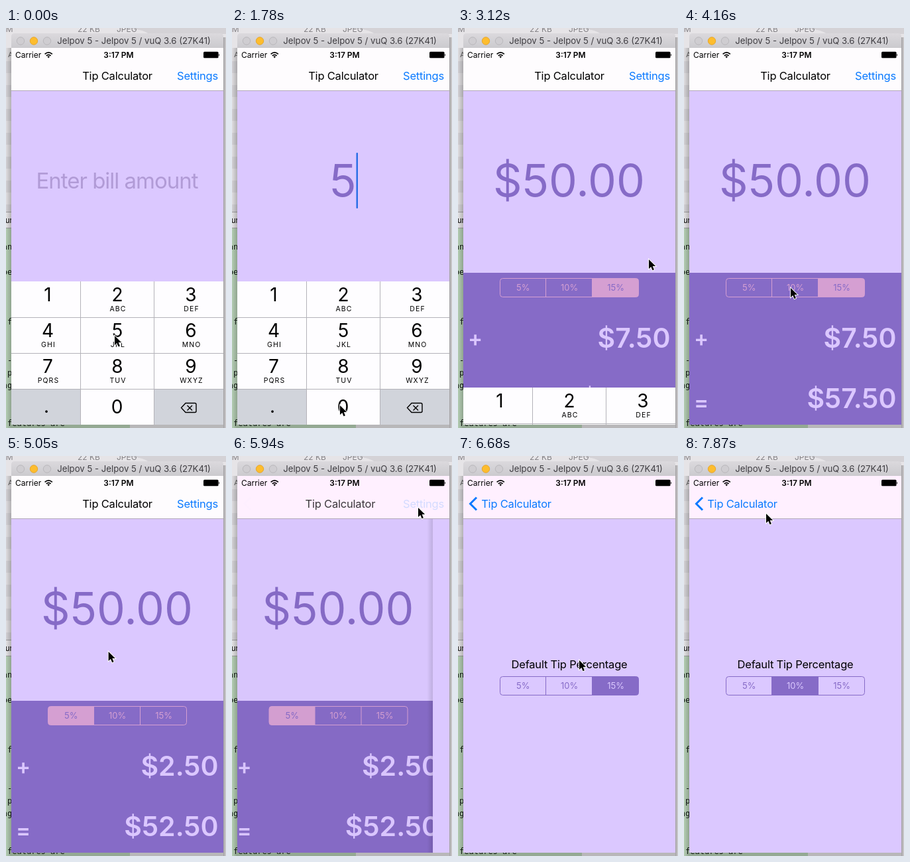
Animation, 332 px wide and 603 px high, one loop 8 s. Source, as an HTML page:

```html
<!DOCTYPE html>
<html lang="en">
<head>
<meta charset="utf-8">
<title>Tip Calculator</title>
<style>
  html, body { margin: 0; width: 332px; height: 603px; overflow: hidden; background: #dcdadd; }
  svg { display: block; }
  text { font: 400 16.5px Inter, sans-serif; font-optical-sizing: none; white-space: pre; }
  .label { letter-spacing: -.2px; }
  .status { font-size: 12px; }
  .code { font: 12px "DejaVu Sans Mono", monospace; }
  .desk { font-size: 12px; fill: #858387; }
  .digit { font-size: 28px; }
  .letters { font-size: 10.5px; letter-spacing: 1.1px; }
  .seg text { font-size: 13px; }
  .bill { font-size: 68px; fill: #866bc7; }
  .hint { font-size: 33px; letter-spacing: -1px; fill: #b19bd6; }
  .sum { font-weight: 600; font-size: 41px; fill: #dbc7ff; }
  .sign { font-weight: 600; font-size: 33px; fill: #dbc7ff; }
  .mid { text-anchor: middle; }
  .end { text-anchor: end; }
</style>
</head>
<body>
<svg width="332" height="603" viewBox="0 0 332 603">
  <defs>
    <clipPath id="screen"><rect x="8" y="95" width="320" height="503"/></clipPath>
    <linearGradient id="bar" x2="0" y2="1"><stop stop-color="#dbd9dd"/><stop offset="1" stop-color="#cbcace"/></linearGradient>
    <linearGradient id="edge"><stop stop-opacity="0"/><stop offset="1" stop-opacity=".12"/></linearGradient>
    <linearGradient id="left"><stop stop-opacity=".03"/><stop offset="1" stop-opacity=".22"/></linearGradient>
    <linearGradient id="right"><stop stop-opacity=".3"/><stop offset="1" stop-opacity=".1"/></linearGradient>
  </defs>

  <g id="desktop">
    <rect width="332" height="603" fill="#e6e4e7"/>
    <path d="M186 0Q208 3 216 9H332V0z" fill="#d4d2d6"/>
    <text class="desk" x="-8" y="6">PM</text>
    <text class="desk" x="108" y="6">22 KB</text>
    <text class="desk" x="167" y="6">JPEG</text>
    <g id="rows"></g>
    <path d="M0 302H8V598H187V603H0z" fill="#b9d3b8"/>
    <rect y="277" width="8" height="25" fill="#e9e8ea"/>
    <path d="M0 277.5H8M0 301.5H8" stroke="#a3a2a5"/>
    <text x="-1" y="294" style="font-size:11px">ur</text>
    <text x="3" y="44" style="font-size:11px" fill="#666">A</text>
    <g id="notes"></g>
    <rect y="30" width="8" height="573" fill="url(#left)"/>
    <rect x="328" y="14" width="4" height="589" fill="url(#right)"/>
    <rect x="8" y="598" width="320" height="5" opacity=".2"/>
  </g>

  <path d="M8 30V13Q8 8 13 8H323Q328 8 328 13V30z" fill="url(#bar)"/>
  <g stroke-width="1" fill="#cfcdd1" stroke="#b9b7bb">
    <circle cx="22" cy="19.5" r="5.7"/>
    <circle cx="42" cy="19.5" r="5.7" fill="#fdbd2e" stroke="#e6a52a"/>
    <circle cx="62" cy="19.5" r="5.7"/>
  </g>
  <text class="mid" x="193" y="24" style="font-size:13.2px" fill="#3f3d42">Jelpov 5 - Jelpov 5 / vuQ 3.6 (27K41)</text>

  <g clip-path="url(#screen)">
    <g id="main">
      <rect x="8" y="95" width="420" height="503" fill="#dbc8ff"/>
      <text id="hint" class="hint mid" x="167.5" y="242">Enter bill amount</text>
      <text id="bill" class="bill mid" x="167.5" y="254.3"></text>
      <g id="panel">
        <rect x="8" y="369" width="420" height="229" fill="#866bc7"/>
        <g id="tipSeg" class="seg"></g>
        <text class="sign" x="15" y="480">+</text>
        <text class="sign" x="15" y="575.5">=</text>
        <text id="tip" class="sum end" x="320.5" y="481.5"></text>
        <text id="total" class="sum end" x="320.5" y="572.5"></text>
      </g>
      <rect id="caret" width="2.5" rx="1" fill="#2b6fe6"/>
    </g>
    <rect id="dim" x="8" y="95" width="320" height="503"/>
    <g id="prefs">
      <rect x="-1" y="95" width="9" height="503" fill="url(#edge)"/>
      <rect x="8" y="95" width="320" height="503" fill="#dbc8ff"/>
      <text class="label mid" x="168" y="320">Default Tip Percentage</text>
      <g id="prefSeg" class="seg"></g>
    </g>
    <g id="pad"></g>
  </g>

  <rect id="nav" x="8" y="30" width="320" height="64"/>
  <path d="M8 94.5H328" stroke="#b5abba"/>
  <text class="status" x="14" y="45">Carrier</text>
  <g fill="none" stroke="#000" stroke-width="1.7">
    <path d="M58.6 39.3Q64.2 34.3 69.8 39.3M60.8 41.8Q64.2 38.8 67.6 41.8"/>
    <path d="M62.4 43L64.2 45.4 66 43Q64.2 41.6 62.4 43z" fill="#000" stroke="none"/>
  </g>
  <text class="status mid" x="170" y="45" style="font-weight:600">3:17 PM</text>
  <rect x="298" y="35.7" width="22.5" height="9.6" rx="1.5"/>
  <path d="M321 39Q323 40.5 321 42.4z"/>
  <text id="title" class="label mid" y="78">Tip Calculator</text>
  <text id="settings" class="label end" x="320" y="78" fill="#0a7aff">Settings</text>
  <g id="back" fill="none" stroke="#0a7aff" stroke-width="3">
    <path d="M28 62.5L18.5 72 28 81.5"/>
  </g>
  <text id="backLabel" class="label mid" y="78" fill="#0a7aff">Tip Calculator</text>

  <path id="cursor" d="M0 1V15L3.3 12 5.5 17.2 7.9 16.2 5.7 11.1H10.1z" stroke="#fff" stroke-width="1.8" paint-order="stroke"/>
</svg>
<script>
const LOOP = 8000;
const $ = id => document.getElementById(id);
const set = (id, attrs) => { for (const k in attrs) $(id).setAttribute(k, attrs[k]); };
const text = (x, y, str, cls, fill = '#000') => `<text x="${x}" y="${y}" class="${cls}" fill="${fill}">${str}</text>`;
const rect = (x, y, w, h, fill, more = '') => `<rect x="${x}" y="${y}" width="${w}" height="${h}" fill="${fill}" ${more}/>`;

// Screen refreshes come in bursts: first time, last time, count.
const bursts = [
  [0, 0, 1], [300, 300, 1], [600, 600, 1], [1040, 1340, 3], [1640, 1780, 2], [2080, 2230, 2],
  [2530, 2820, 3], [3120, 3570, 4], [3870, 4750, 7], [5050, 6090, 8], [6230, 7270, 8], [7570, 7870, 3]
];
const ticks = bursts.flatMap(([a, b, n]) =>
  Array.from({ length: n }, (_, i) => Math.round((a + (n > 1 ? i * (b - a) / (n - 1) : 0)) / 10) * 10));

// Tables of [time, value...]; tween interpolates, hold keeps the last value.
const pointer = [
  [0, 164, 463], [880, 164, 463], [1340, 163, 568], [2380, 163, 568], [2820, 288, 348],
  [3720, 288, 348], [3870, 270, 342], [4160, 161, 391], [4310, 161, 391], [4600, 97, 391],
  [4900, 97, 391], [5350, 270, 100], [5500, 281, 77], [6230, 281, 77], [6680, 183, 307],
  [6970, 161, 337], [7420, 161, 337], [7870, 124, 86]
];
const push = [[0, 0], [5880, 0], [5940, .078], [6090, .62], [6230, .95], [6380, 1]];
const padDrop = [[0, 0], [2980, 0], [3120, 160], [3270, 208], [3420, 216]];
const caretOn = [[0, 0], [300, 1], [1040, .5], [1190, 0], [1640, .5], [1780, 1], [2080, .6], [2230, 1], [2530, .5], [2680, 0]];
const entry = [[0, ''], [600, '5'], [2230, '50'], [3120, '$50.00']];
const tipPick = [[0, 2], [4310, 1], [4750, 0]];
const prefPick = [[0, 2], [6970, 1]];

const hold = (table, t) => table.filter(row => row[0] <= t).pop()[1];
function tween(table, t) {
  const i = table.findIndex(row => row[0] > t);
  if (i < 0) return table[table.length - 1].slice(1);
  const a = table[i - 1], b = table[i], k = (t - a[0]) / (b[0] - a[0]);
  return a.slice(1).map((v, j) => v + (b[j + 1] - v) * k);
}

function segments(y, pick, color, onColor) {
  const shape = ['M132.5 Y0H67Q63.5 Y0 63.5 Y1V Y2Q63.5 Y3 67 Y3H132.5z', 'M132.5 Y0H202.5V Y3H132.5z',
    'M202.5 Y0H269Q272.5 Y0 272.5 Y1V Y2Q272.5 Y3 269 Y3H202.5z'][pick]
    .replace(/Y(\d)/g, (_, n) => y + [.5, 4, 25, 28.5][n]);
  return `<path d="${shape}" fill="${color}"/>` +
    rect(63.5, y + .5, 209, 28, 'none', `rx="4" stroke="${color}"`) +
    `<path d="M132.5 ${y}v29M202.5 ${y}v29" stroke="${color}"/>` +
    ['5%', '10%', '15%'].map((s, i) => text(98.2 + 70 * i, y + 19, s, 'mid', i === pick ? onColor : color)).join('');
}

function keypad() {
  const letters = ['', 'ABC', 'DEF', 'GHI', 'JKL', 'MNO', 'PQRS', 'TUV', 'WXYZ'];
  const centers = [63, 168, 279];
  let out = rect(8, 382, 320, 216, '#fefdff') + rect(8, 544, 105, 54, '#d1d4db') +
    rect(223, 544, 105, 54, '#d1d4db') + rect(113, 544, 110, 54, '#d1d4db', 'id="zero"');
  letters.forEach((s, i) => {
    const x = centers[i % 3], y = 411.5 + 54 * Math.floor(i / 3);
    out += text(x, y, i + 1, 'digit mid') + text(x + 1, y + 15.5, s, 'letters mid');
  });
  return out + text(167.5, 581, '0', 'digit mid') + text(61, 580, '.', 'digit mid') +
    '<path d="M8 436.5H328M8 490.5H328M8 544.5H328M112.5 382V598M223.5 382V598" stroke="#b4b3b9"/>' +
    '<path d="M264.5 572.5L271 565.5H285Q287 565.5 287 567.5V577.5Q287 579.5 285 579.5H271zM273.5 569L281 576.5M281 569L273.5 576.5" fill="none" stroke="#000" stroke-width="1.4"/>';
}

function draw(t) {
  const [p] = tween(push, t), [drop] = tween(padDrop, t), [x, y] = tween(pointer, t);
  const bill = hold(entry, t), pick = hold(tipPick, t), done = bill[0] === '$';
  const tip = 50 * (pick + 1) * .05;

  $('bill').textContent = bill;
  $('tip').textContent = '$' + tip.toFixed(2);
  $('total').textContent = '$' + (50 + tip).toFixed(2);
  $('tipSeg').innerHTML = segments(377, pick, '#d59fd2', '#866bc7');
  $('prefSeg').innerHTML = segments(332, hold(prefPick, t), '#866bc7', '#dbc8ff');
  set('hint', { opacity: bill ? 0 : 1 });
  set('panel', { opacity: done ? 1 : 0 });
  set('caret', {
    x: bill ? 167 + 20.5 * bill.length : 44, y: bill ? 188 : 209,
    height: bill ? 84 : 41, opacity: done ? 0 : hold(caretOn, t)
  });
  set('zero', { opacity: t >= 2080 && t < 2230 ? 1 : 0 });
  set('pad', { transform: `translate(0 ${drop})` });

  set('main', { transform: `translate(${-96 * p})` });
  set('dim', { opacity: .1 * p });
  set('prefs', { transform: `translate(${320 * (1 - p)})`, opacity: p ? 1 : 0 });
  set('nav', { fill: p ? '#fff0ff' : '#fefcfe' });
  set('title', { x: 168 - 60 * p, opacity: Math.max(0, 1 - 3 * p) });
  set('backLabel', { x: 168 - 80 * p, opacity: Math.max(0, 2 * p - 1) });
  set('back', { opacity: p * p });
  set('settings', { opacity: t < 5790 ? 1 : Math.max(0, .2 - .3 * p) });
  set('cursor', { transform: `translate(${x} ${y})` });
}

$('pad').innerHTML = keypad();
$('rows').innerHTML = Array.from({ length: 7 }, (_, i) => rect(0, 50 + 36 * i, 8, 18, '#d9d7db')).join('');
$('notes').innerHTML = [['an', 334], ['pe', 372], [' f', 447], [' -', 505], [' p', 524], ['ng', 543], [' features are', 600]]
  .map(([s, y]) => text(-5.2, y, s, 'code', '#101812')).join('');

const start = performance.now();
let shown = -1;
function frame() {
  const now = (performance.now() - start) % LOOP;
  const tick = ticks.filter(t => t <= now).pop() ?? 0;
  if (tick !== shown) draw(shown = tick);
  requestAnimationFrame(frame);
}
frame();
</script>
</body>
</html>
```
